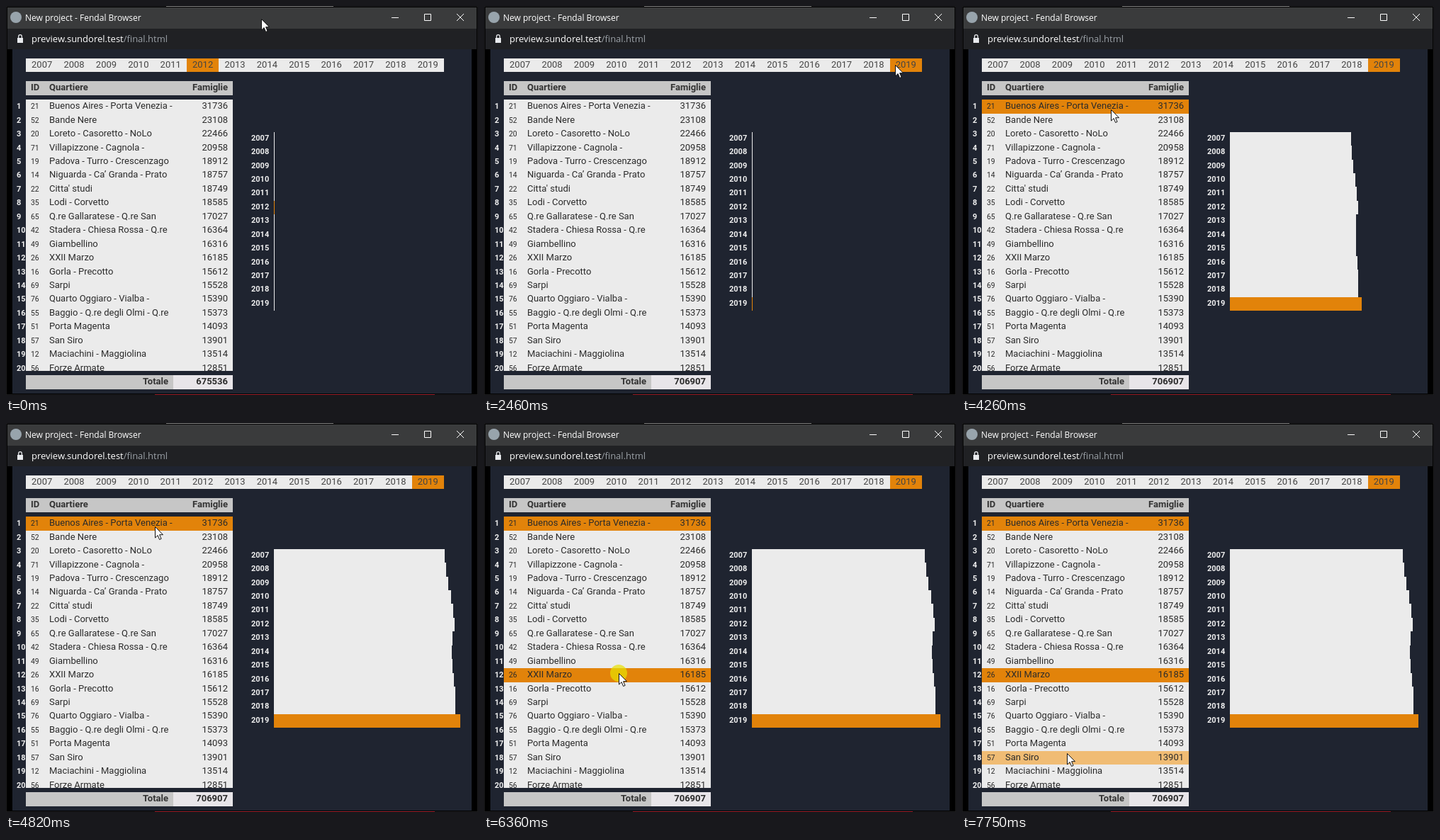
These frames come from a looping animation (666x549 px, 8000 ms). An HTML page:

```html
<!DOCTYPE html>
<html lang="it">
<head>
<meta charset="utf-8">
<title>Quartieri</title>
<style>
  html, body { margin: 0; width: 100%; height: 100%; overflow: hidden; background: #000; }
  svg { display: block; width: 666px; height: 549px; }
  text { font: 13px Roboto, sans-serif; fill: #2b2b2b; white-space: pre; }
  .bold { font-weight: 700; }
  .head { font-weight: 700; fill: #333; }
  .year { fill: #444; }
  .id { font-size: 10.4px; }
  .label { font-size: 11px; font-weight: 700; fill: #f0f0f0; }
  .title { font: 12px "Open Sans", sans-serif; fill: #fff; }
  .url { font: 13px "Open Sans", sans-serif; fill: #fff; }
</style>
</head>
<body>
<svg id="stage" viewBox="0 0 666 549"></svg>
<script>
const LOOP = 8000, TICK = 80;
const LIGHT = '#ebebeb', GREY = '#c6c6c6', ORANGE = '#e2830a', HOVER = '#f0bc74';

const districts = `21|Buenos Aires - Porta Venezia -|31736
52|Bande Nere|23108
20|Loreto - Casoretto - NoLo|22466
71|Villapizzone - Cagnola -|20958
19|Padova - Turro - Crescenzago|18912
14|Niguarda - Ca’ Granda - Prato|18757
22|Citta' studi|18749
35|Lodi - Corvetto|18585
65|Q.re Gallaratese - Q.re San|17027
42|Stadera - Chiesa Rossa - Q.re|16364
49|Giambellino|16316
26|XXII Marzo|16185
16|Gorla - Precotto|15612
69|Sarpi|15528
76|Quarto Oggiaro - Vialba -|15390
55|Baggio - Q.re degli Olmi - Q.re|15373
51|Porta Magenta|14093
57|San Siro|13901
12|Maciachini - Maggiolina|13514
56|Forze Armate|12851`.split('\n').map(line => line.split('|'));

const years = Array.from({ length: 13 }, (_, i) => 2007 + i);
const barWidths = [244, 246, 249, 253, 256, 258, 255, 254, 255, 257, 259, 259, 266];

const yearBar = { x: 28, y: 74, w: 590 / 13, h: 19 };
const table = { x: 28, y: 132.17, w: 292, h: 19.45, bottom: 515 };
const chart = { x: 378, y: 177.8, h: 19.42 };

// Cursor moves: start, end, from, to
const moves = [
  { start: 420, end: 1140, from: [360, 18], to: [580, 83] },
  { start: 2460, end: 3180, from: [580, 83], to: [210, 146] },
  { start: 5140, end: 5880, from: [210, 146], to: [190, 353] },
  { start: 7350, end: 7750, from: [190, 353], to: [148, 466] }
];
const clicks = [[1470, 1630], [3510, 3680], [6360, 6440]];
const [yearClick, firstRowClick, secondRowClick] = clicks.map(c => c[0]);
const GROW_START = 4100;

const stage = document.getElementById('stage');

function add(tag, attrs, parent = stage) {
  const node = document.createElementNS('http://www.w3.org/2000/svg', tag);
  for (const key in attrs) node.setAttribute(key, attrs[key]);
  parent.appendChild(node);
  return node;
}

// Edges snap to whole pixels, so neighbours meet without seams
function rect(left, top, w, h, fill, parent) {
  const x = Math.round(left), y = Math.round(top);
  const width = Math.round(left + w) - x, height = Math.round(top + h) - y;
  return add('rect', { x, y, width, height, fill }, parent);
}

function text(x, y, content, cls = '', anchor = 'start', parent) {
  const node = add('text', { x, y: Math.round(y), class: cls, 'text-anchor': anchor }, parent);
  node.textContent = content;
  return node;
}

function drawWindow() {
  rect(0, 0, 666, 549, '#1c1c1e');
  rect(226, 0, 236, 1, '#8a8a8a');
  rect(1, 1, 664, 547, '#000');
  rect(2, 2, 662, 30, '#3a3b3c');
  rect(2, 32, 662, 29, '#202124');
  rect(9, 61, 648, 486, '#1f2430');
  rect(210, 548, 395, 1, '#a02430');
  add('circle', { cx: 14, cy: 16, r: 8, fill: '#98a4ac' });
  text(27, 21, 'New project - Fendal Browser', 'title');
  add('path', { d: 'M544 16.5h10M590.5 11.5h9v9h-9zM636 11l10 10m0-10l-10 10', fill: 'none', stroke: '#fff' });
  rect(16, 45, 8, 7, '#e8eaed');
  add('path', { d: 'M17.7 45v-2a2.3 2.3 0 0 1 4.6 0v2', fill: 'none', stroke: '#e8eaed', 'stroke-width': 1.3 });
  const url = text(36, 51, 'preview.sundorel.test', 'url');
  add('tspan', { fill: '#9aa0a6' }, url).textContent = '/final.html';
}

function drawYears() {
  const cells = years.map((_, i) =>
    rect(yearBar.x + i * yearBar.w, yearBar.y, yearBar.w, yearBar.h, LIGHT));
  years.forEach((year, i) =>
    text(yearBar.x + (i + 0.5) * yearBar.w, 87, year, 'year', 'middle'));
  return cells;
}

function drawTable() {
  const right = 313;
  rect(table.x, 106, table.w, 20, GREY);
  text(35, 119, 'ID', 'head');
  text(61, 119, 'Quartiere', 'head');
  text(right, 119, 'Famiglie', 'head', 'end');

  const clip = add('clipPath', { id: 'tableClip' });
  rect(table.x, table.y, table.w, table.bottom - table.y, '#000', clip);
  const body = add('g', { 'clip-path': 'url(#tableClip)' });
  const rows = districts.map((_, i) =>
    rect(table.x, table.y + i * table.h, table.w, table.h, LIGHT, body));
  districts.forEach(([id, name, families], i) => {
    const baseline = table.y + i * table.h + 13;
    text(15, baseline, i + 1, 'label');
    text(35, baseline, id, 'id', 'start', body);
    text(61, baseline, name, '', 'start', body);
    text(right, baseline, families, '', 'end', body);
  });

  rect(table.x, 521, 208, 20, GREY);
  rect(236, 521, 84, 20, '#e8e5e9');
  text(229, 534, 'Totale', 'head', 'end');
  return { rows, total: text(right, 534, '', 'bold', 'end') };
}

function drawChart() {
  return years.map((year, i) => {
    const top = chart.y + i * chart.h;
    text(346, top + 12, year, 'label');
    return rect(chart.x, top, 1, chart.h, LIGHT);
  });
}

drawWindow();
const yearCells = drawYears();
const { rows, total } = drawTable();
const bars = drawChart();
const clickDot = add('circle', { r: 12, fill: '#e8e100', 'fill-opacity': 0.7 });
const cursor = add('path', {
  d: 'M.5.5v15.5l3.6-3.4 2.5 5.9 2.5-1.1-2.5-5.7h4.9z',
  fill: '#fff', stroke: '#111', 'stroke-width': 1, 'stroke-linejoin': 'round'
});

const smooth = p => p * p * (3 - 2 * p);

function cursorAt(t, lag = 0) {
  const move = moves.filter(m => t >= m.start).pop();
  if (!move) return moves[0].from;
  const elapsed = Math.floor((t - move.start) / TICK) * TICK - lag;
  const p = smooth(Math.min(1, Math.max(0, elapsed / (move.end - move.start))));
  return move.from.map((a, i) => a + (move.to[i] - a) * p);
}

// Fast approach followed by a slow settling tail
function growth(t) {
  const u = Math.floor((t - GROW_START) / TICK) * TICK;
  return u <= 0 ? 0 : 1 - 0.985 * Math.exp(-u / 130) - 0.015 * Math.exp(-u / 900);
}

function render(t) {
  const [x, y] = cursorAt(t).map(Math.round);
  const [hx, hy] = cursorAt(t, 40);
  const selectedYear = t < yearClick ? 5 : 12;
  const shade = (selected, hovered) => selected ? ORANGE : hovered ? HOVER : LIGHT;

  const overYears = hy >= yearBar.y && hy < yearBar.y + yearBar.h;
  const hoverYear = overYears ? Math.floor((hx - yearBar.x) / yearBar.w) : -1;
  yearCells.forEach((cell, i) => cell.setAttribute('fill', shade(i === selectedYear, i === hoverYear)));

  const overTable = hx >= table.x && hx < table.x + table.w && hy >= table.y;
  const hoverRow = overTable ? Math.floor((hy - table.y) / table.h) : -1;
  rows.forEach((row, i) => {
    const selected = (i === 0 && t >= firstRowClick) || (i === 11 && t >= secondRowClick);
    row.setAttribute('fill', shade(selected, i === hoverRow));
  });

  total.textContent = t < yearClick ? 675536 : 706907;

  const grown = growth(t);
  bars.forEach((bar, i) => {
    bar.setAttribute('width', Math.max(1, Math.round(barWidths[i] * grown)));
    bar.setAttribute('fill', shade(i === selectedYear));
  });

  cursor.setAttribute('transform', `translate(${x} ${y})`);
  clickDot.setAttribute('cx', x);
  clickDot.setAttribute('cy', y);
  const pressed = clicks.some(([down, up]) => t >= down && t < up);
  clickDot.setAttribute('visibility', pressed ? 'visible' : 'hidden');
}

const begin = performance.now();
function frame() {
  render((performance.now() - begin) % LOOP);
  requestAnimationFrame(frame);
}
frame();
</script>
</body>
</html>
```
